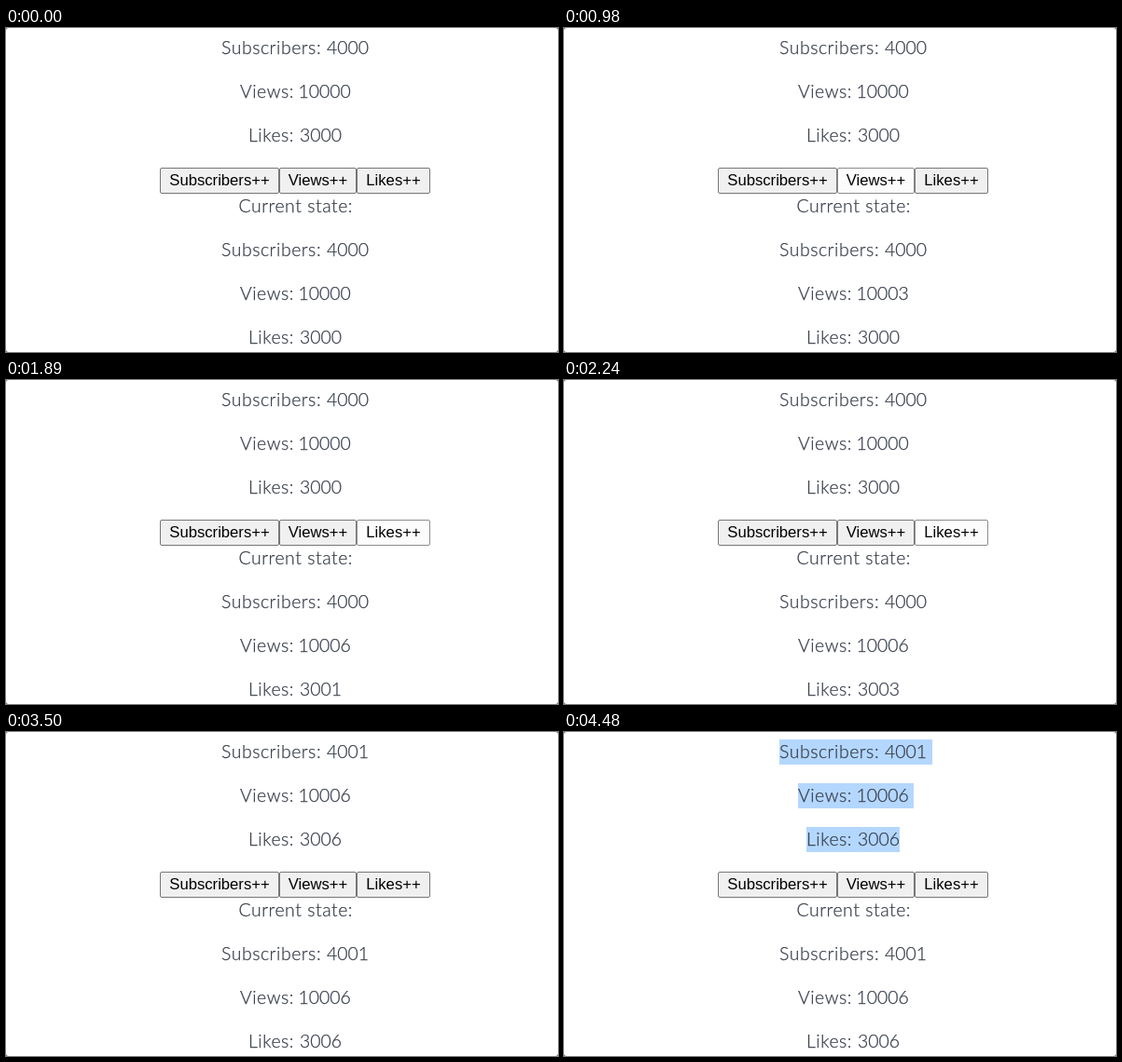
These frames come from a looping animation (592x348 px, 6.65 s). An HTML page:

```html
<!DOCTYPE html>
<html lang="en">
<head>
<meta charset="utf-8">
<title>Counters</title>
<style>
  html, body { margin: 0; width: 100%; height: 100%; overflow: hidden; background: #777; }
  svg { display: block; width: 592px; height: 348px; background: #fff; border-radius: 3px; }
  .copy {
    font: 300 19.4px Lato, sans-serif; letter-spacing: .55px;
    fill: #363d4a; stroke: #363d4a; stroke-width: .25px;
  }
  .value { letter-spacing: 0; }
  .mark { fill: #b4d7ff; }
  .button rect { fill: #f0f0f0; stroke: #767676; }
  .button text { font: 16.667px "Liberation Sans", Arial, sans-serif; text-anchor: middle; fill: #000; }
  .button.hover rect { fill: #e5e5e5; stroke: #4f4f4f; }
  .button.active rect { fill: #fcfcfc; stroke: #8d8d8d; }
</style>
</head>
<body>
<svg id="stage" viewBox="0 0 592 348"></svg>
<script>
const LOOP = 6650;
const stage = document.getElementById('stage');

// label x, value x, right end of the selection, first baseline, start value
const rows = [
  { name: 'Subscribers', x: 231, valueX: 344, end: 395, y: 28, start: 4000 },
  { name: 'Views', x: 251, valueX: 313.5, end: 375, y: 75, start: 10000 },
  { name: 'Likes', x: 260, valueX: 315, end: 360, y: 122, start: 3000 }
];
const SUBS = 0, VIEWS = 1, LIKES = 2;

// time, button under the pointer, its look, clicks so far
const clicks = [
  [70, VIEWS, 'hover', 0],
  [700, VIEWS, 'active', 0], [770, VIEWS, 'hover', 1],
  [840, VIEWS, 'active', 1], [910, VIEWS, 'hover', 2],
  [980, VIEWS, 'active', 3], [1050, VIEWS, 'hover', 4],
  [1120, VIEWS, 'hover', 5], [1260, VIEWS, 'active', 5],
  [1330, VIEWS, 'hover', 6],
  [1540, LIKES, 'hover', 0],
  [1750, LIKES, 'active', 0], [1820, LIKES, 'hover', 1],
  [1890, LIKES, 'active', 1], [1960, LIKES, 'hover', 2],
  [2100, LIKES, 'active', 2], [2170, LIKES, 'hover', 3],
  [2240, LIKES, 'active', 3], [2310, LIKES, 'hover', 4],
  [2380, LIKES, 'active', 4], [2520, LIKES, 'hover', 5],
  [2590, LIKES, 'active', 5], [2660, LIKES, 'hover', 6],
  [2730, SUBS, 'hover', 0], [3080, SUBS, 'active', 0],
  [3150, SUBS, 'hover', 1],
  [3220, VIEWS, 'hover', 6], [3290, VIEWS, '', 6],
  [3430, LIKES, 'hover', 6], [3500, LIKES, '', 6]
];

// time, row, left edge of its selection
const drags = [
  [3920, LIKES, 315], [3990, LIKES, 260],
  [4060, VIEWS, 314], [4130, VIEWS, 251],
  [4480, SUBS, 231]
];

function add(parent, tag, attrs, text = '') {
  const el = document.createElementNS('http://www.w3.org/2000/svg', tag);
  for (const key in attrs) el.setAttribute(key, attrs[key]);
  el.textContent = text;
  return parent.appendChild(el);
}

function addRow(row, y) {
  add(stage, 'text', { class: 'copy', x: row.x, y }, row.name + ':');
  return add(stage, 'text', { class: 'copy value', x: row.valueX, y });
}

function addButton(name, x, width) {
  const g = add(stage, 'g', { class: 'button' });
  add(g, 'rect', { x: x + .5, y: 150.5, width: width - 1, height: 27, rx: 1.5 });
  add(g, 'text', { x: x + width / 2, y: 169 }, name + '++');
  return g;
}

const marks = rows.map(r => add(stage, 'rect', { class: 'mark', y: r.y - 20, height: 27 }));
const shown = rows.map(r => addRow(r, r.y));
const current = rows.map(r => addRow(r, r.y + 217));
add(stage, 'text', { class: 'copy', x: 249.5, y: 198 }, 'Current state:');
const buttons = [
  addButton('Subscribers', 165, 128),
  addButton('Views', 293, 83),
  addButton('Likes', 376, 79)
];

function draw(t) {
  const counts = [0, 0, 0];
  let hot = -1, look = '';
  for (const [time, id, state, count] of clicks) {
    if (time > t) break;
    hot = id;
    look = state;
    counts[id] = count;
  }
  const left = rows.map(r => r.end);
  for (const [time, id, x] of drags) if (time <= t) left[id] = x;

  rows.forEach((row, i) => {
    const value = row.start + counts[i];
    current[i].textContent = value;
    // the upper list refreshes only when subscribers change
    shown[i].textContent = counts[SUBS] ? value : row.start;
    buttons[i].setAttribute('class', i === hot ? 'button ' + look : 'button');
    marks[i].setAttribute('x', left[i]);
    marks[i].setAttribute('width', row.end - left[i]);
  });
}

const begin = performance.now();
function tick() {
  draw((performance.now() - begin) % LOOP);
  requestAnimationFrame(tick);
}
tick();
</script>
</body>
</html>
```
